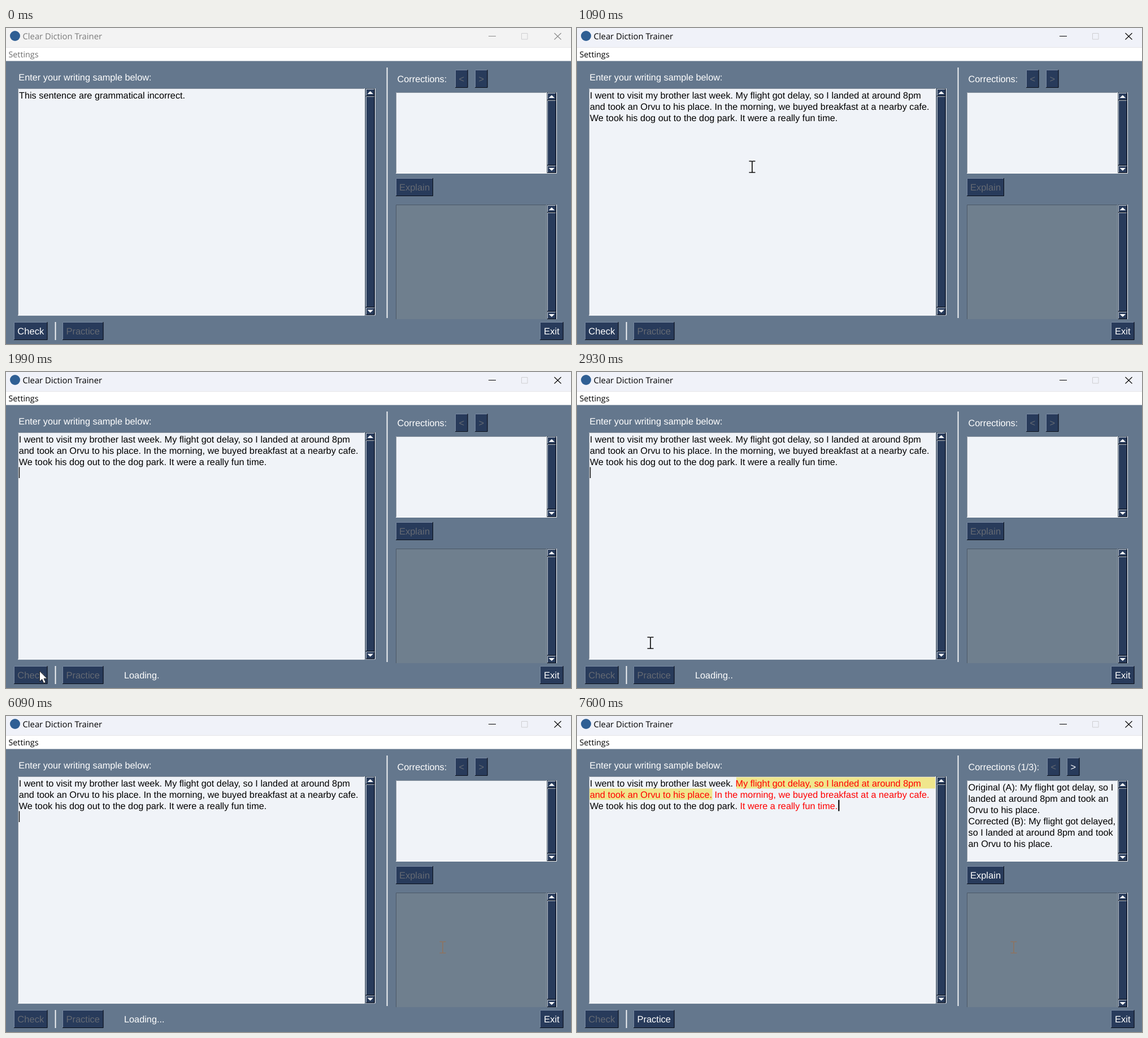
An HTML page for the animation above (8000 ms loop, 1000 by 560 pixels).

```html
<!DOCTYPE html>
<html lang="en">
<head>
<meta charset="utf-8">
<title>Clear Diction Trainer</title>
<style>
  html, body { margin: 0; width: 100%; height: 100%; overflow: hidden; background: #64778d; }
  svg { display: block; width: 1000px; height: 560px; }
  text { font: 16.3px "Liberation Sans", Arial, sans-serif; white-space: pre; text-rendering: geometricPrecision; }
  text.ui { font: 14.3px "Open Sans", sans-serif; }
  text.title { font-size: 14.8px; }
</style>
</head>
<body>
<svg id="stage" viewBox="0 0 1000 560" xmlns="http://www.w3.org/2000/svg"></svg>
<script>
const LOOP = 8000, STEP = 70;
const NAVY = '#283b5b', PAPER = '#f0f3f8', DIM = '#656a73';

const rect = (x, y, w, h, fill, extra = '') =>
  `<rect x="${x}" y="${y}" width="${w}" height="${h}" fill="${fill}" ${extra}/>`;
const line = (d, color, w = 1) => `<path d="${d}" fill="none" stroke="${color}" stroke-width="${w}"/>`;
const text = (x, y, s, fill = '#000', extra = '') => `<text x="${x}" y="${y}" fill="${fill}" ${extra}>${s}</text>`;
const group = (id, body) => `<g id="${id}">${body}</g>`;
const lines = (x, y, rows, fill) => rows.map((s, i) => text(x, y + i * 20, s, fill)).join('');
const red = s => `<tspan fill="#f00">${s}</tspan>`;

// filled box with separate top-left and bottom-right edges
const bevel = (x, y, w, h, fill, lit, shade) =>
  rect(x, y, w, h, fill) +
  line(`M${x + .5} ${y + h}V${y + .5}H${x + w}`, lit) +
  line(`M${x + w - .5} ${y}V${y + h - .5}H${x}`, shade);

function button(id, x, y, w, label) {
  return group(id,
    bevel(x, y, w, 32, NAVY, '#7b8ba3', '#0a0f18') +
    text(x + w / 2, y + 22, label, '#fff', 'text-anchor="middle" style="font-size:16.5px"'));
}

function scrollbar(x, y, h) {
  const raised = (top, height) => bevel(x + 1, top, 15.5, height, NAVY, '#c3ccd8', '#0a0f18');
  const arrow = (top, dir) => raised(top, 13) +
    `<path d="M${x + 3.5} ${top + 6.5 + 2.5 * dir}h10.5l-5.25 ${-5 * dir}z" fill="#fff"/>`;
  return bevel(x, y, 18, h, NAVY, '#4b5867', '#f4f6f8') +
    raised(y + 14, h - 28.5) + arrow(y + 1, 1) + arrow(y + h - 14, -1);
}

const field = (x, y, w, h) => bevel(x, y, w, h, PAPER, '#8a939e', '#fff');

const intro = 'I went to visit my brother last week. ';
const flight = 'My flight got delay, so I landed at around 8pm';
const ride = 'and took an Orvu to his place.';
const morning = ' In the morning, we buyed breakfast at a nearby cafe.';
const park = 'We took his dog out to the dog park. ';
const fun = 'It were a really fun time.';
const first = 'This sentence are grammatical incorrect.';

document.getElementById('stage').innerHTML =
  rect(0, 0, 1000, 560, '#64778d') +
  rect(0, 0, 1000, 34, '#f3f3f3', 'id="bar"') + rect(0, 34, 1000, 1, '#e6e6e8') +
  rect(0, 35, 1000, 23.5, '#fff') +
  '<circle cx="16" cy="14" r="9" fill="#2f5f94"/>' +
  text(29.5, 20, 'Clear Diction Trainer', '#000', 'id="name" class="ui title"') +
  text(4.5, 51.5, 'Settings', '#000', 'id="menu" class="ui"') +
  group('controls', line('M854 14.5H867M970.5 9l12 11.5M982.5 9l-12 11.5', 'currentColor', 1.1)) +
  line('M912.5 9.5h10.5v10.5h-10.5z', '#cfcfd2') +

  text(22.3, 92.5, 'Enter your writing sample below:', '#fff') +
  field(21, 107, 614, 402.5) + scrollbar(636, 107, 402.5) +
  rect(673, 70, 1, 444, '#a3aebb') + rect(674, 70, 1.5, 444, '#f2f4f6') +
  rect(86, 521, 1, 32, '#a3aebb') + rect(87, 521, 1.5, 32, '#f2f4f6') +

  group('before', text(23, 124.5, first)) +
  group('selected', rect(22, 108.5, 612, 20, '#0078d7') + text(23, 124.5, first, '#fff')) +
  group('pasted', lines(22.7, 124.5, [intro + flight, ride + morning, park + fun])) +
  group('marked',
    rect(282, 108.5, 352, 20, '#f0e68c') + rect(22, 128.5, 217.5, 20, '#f0e68c') +
    lines(22.7, 124.5, [intro + red(flight), red(ride + morning), park + red(fun)])) +
  rect(22.8, 168.5, 1.4, 19.5, '#000', 'id="caret"') +
  rect(462.3, 148.7, 2.2, 19.8, '#000', 'id="caretEnd"') +

  text(692.5, 96, '', '#fff', 'id="heading"') +
  button('prev', 795, 74, 22.5, '&lt;') + button('next', 830, 74, 22.5, '&gt;') +
  field(690, 114, 267, 144) + scrollbar(957, 114, 144) +
  group('answer', lines(692.5, 132, [
    'Original (A): My flight got delay, so I', 'landed at around 8pm and took an', 'Orvu to his place.',
    'Corrected (B): My flight got delayed,', 'so I landed at around 8pm and took', 'an Orvu to his place.'])) +
  button('explain', 690, 266, 66, 'Explain') +
  bevel(690, 313, 267, 204, '#6f7f8e', '#4b5867', '#8997a6') + scrollbar(957, 313, 204) +
  rect(690, 516, 285, 2, '#64778d') +

  button('check', 14, 521, 59.5, 'Check') + button('practice', 100, 521, 72.5, 'Practice') +
  button('exit', 945, 521, 41.5, 'Exit') +
  text(209, 543, '', '#fff', 'id="status"') +

  '<circle id="ring" r="15" fill="#f8f652" opacity=".75"/>' +
  group('beam', line('M-5.5 -10H-1.5Q0 -10 0 -8.5Q0 -10 1.5 -10H5.5M0 -9V9M-5.5 10H-1.5Q0 10 0 8.5Q0 10 1.5 10H5.5', 'currentColor', 1.7)) +
  group('arrow', '<path d="M0 0V18.5L4.3 14.6L7.3 21.5L10.6 20L7.7 13.3H13.3Z" fill="#fff" stroke="#222" stroke-width="1"/>');

const el = id => document.getElementById(id);
const show = (id, on) => { el(id).style.display = on ? '' : 'none'; };
const enable = (id, on) => { el(id).lastChild.setAttribute('fill', on ? '#fff' : DIM); };
const move = (id, x, y) => el(id).setAttribute('transform', `translate(${x} ${y})`);
const at = (t, table) => table.reduce((v, [start, next]) => t >= start ? next : v, table[0][1]);
const within = (t, ...spans) => spans.some(([a, b]) => t >= a && t < b);

const dots = [[0, 0], [1990, 1], [2260, 2], [2600, 1], [2930, 2], [3260, 3], [3610, 1], [3870, 2],
  [4220, 3], [4550, 1], [4810, 2], [5160, 3], [5500, 1], [5760, 2], [6090, 3], [6290, 0]];

// pointer stops: time, x, y
const path = [[190, 420, 536], [520, 311, 228], [740, 311, 228], [950, 310, 246], [1350, 310, 246],
  [1780, 59.5, 530], [2190, 59.5, 530], [2400, 130, 480], [3260, 130, 480], [3610, 773, 410]];

function pointer(t) {
  const q = Math.floor(t / STEP) * STEP;
  const i = path.findIndex(p => p[0] > q);
  if (i === 0) return path[0].slice(1);
  if (i < 0) return path[path.length - 1].slice(1);
  const [t0, x0, y0] = path[i - 1], [t1, x1, y1] = path[i];
  const k = (q - t0) / (t1 - t0), e = k * k * (3 - 2 * k);
  return [x0 + (x1 - x0) * e, y0 + (y1 - y0) * e];
}

function draw(t) {
  const active = t >= 520, done = t >= 6290, ready = t >= 6420;
  el('bar').setAttribute('fill', t < 950 ? '#f3f3f3' : '#f0f2f9');
  el('name').setAttribute('fill', active ? '#000' : '#7b7b7b');
  el('menu').setAttribute('fill', active ? '#000' : '#6d6d6d');
  el('controls').style.color = active ? '#000' : '#8a8a8a';

  show('before', t < 810);
  show('selected', within(t, [810, 1090]));
  show('pasted', within(t, [1090, 6290]));
  show('marked', done);
  show('caret', within(t, [1430, 2400], [2930, 3610], [3870, 4550], [4810, 5500], [5760, 6290]));
  show('caretEnd', within(t, [6680, 7270], [7600, LOOP]));

  const n = at(t, dots);
  el('status').textContent = n ? 'Loading' + '.'.repeat(n) : '';
  el('heading').textContent = ready ? 'Corrections (1/3):' : 'Corrections:';
  show('answer', ready);
  move('prev', ready ? 37 : 0, 0);
  move('next', ready ? 37 : 0, 0);
  enable('prev', false);
  enable('next', ready);
  enable('explain', ready);
  enable('practice', ready);
  enable('check', t < 1920);

  const [x, y] = pointer(t);
  const faint = x > 690;
  const beam = faint ? y > 313 : x > 22 && x < 634 && y > 107 && y < 509;
  show('beam', t >= 190 && beam);
  show('arrow', t >= 190 && !beam);
  el('beam').style.color = faint ? '#8d7462' : '#111';
  move('beam', x, y);
  move('arrow', x, y);
  show('ring', within(t, [520, 700], [1850, 1920]));
  move('ring', x - 1, y - 1);
}

const start = performance.now();
function tick() {
  draw((performance.now() - start) % LOOP);
  requestAnimationFrame(tick);
}
tick();
</script>
</body>
</html>
```
